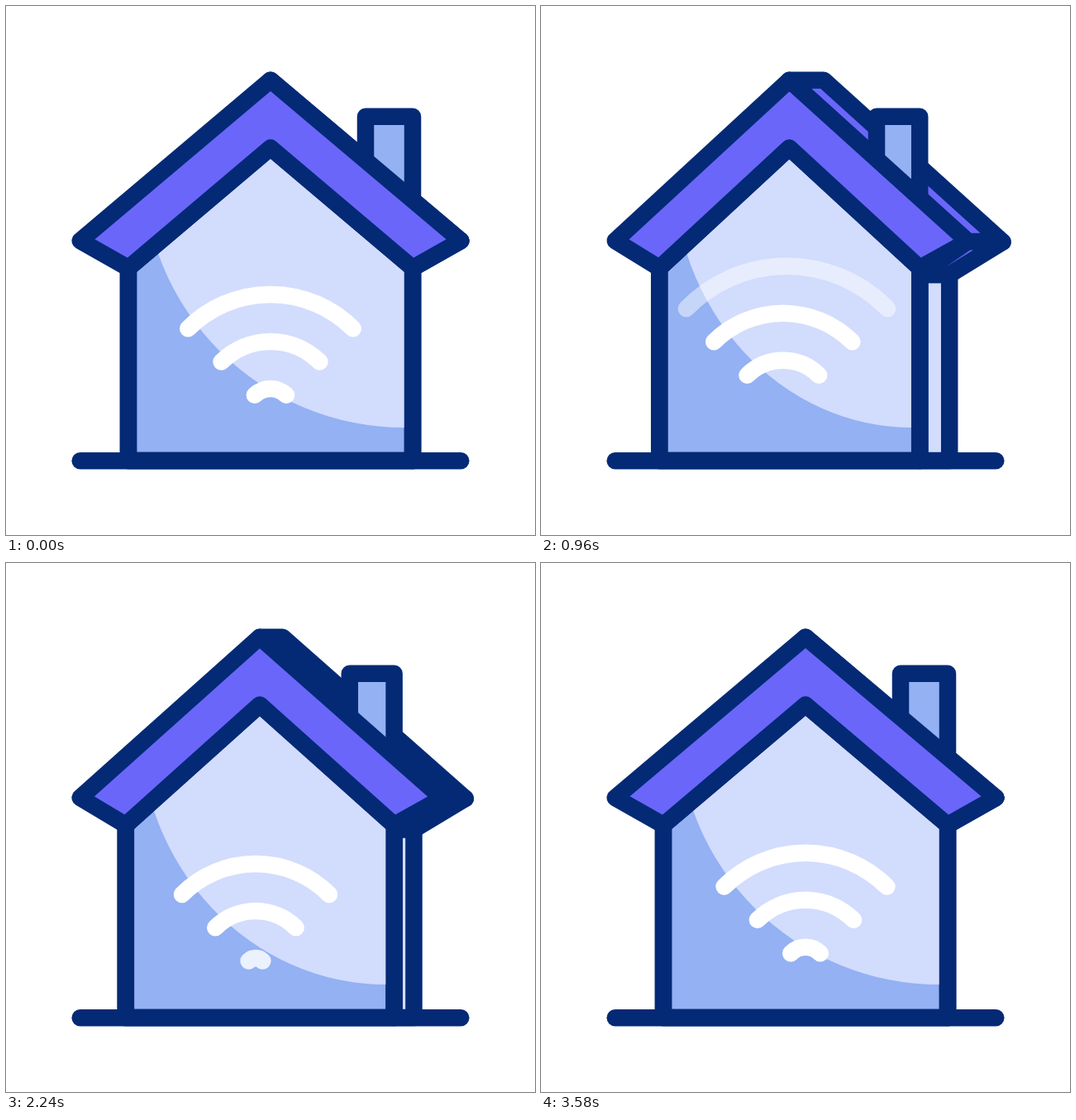
An HTML page with a canvas for the animation above (3600 ms loop, 640 by 640 pixels).

```html
<!DOCTYPE html>
<html lang="en">
<head>
<meta charset="utf-8">
<title>Smart home</title>
<style>
  html, body { margin: 0; width: 100%; height: 100%; overflow: hidden; background: #fff; }
  canvas { display: block; width: 640px; height: 640px; }
</style>
</head>
<body>
<canvas id="stage" width="640" height="640"></canvas>
<script>
const ctx = document.getElementById('stage').getContext('2d');
const NAVY = '#042a76', PURPLE = '#6a66fa', LIGHT = '#d2dcfd', BLUE = '#93b1f3';
const LOOP = 3600, PULSE = 600;
const GAP = 57, R_MIN = 9, R_MAX = R_MIN + 3 * GAP;

const clamp = v => Math.min(1, Math.max(0, v));
const ease = (t, start, end) => {
  const u = clamp((t - start) / (end - start));
  return u * u * (3 - 2 * u);
};

function shape(points, fill, closed = true) {
  ctx.beginPath();
  points.forEach(p => ctx.lineTo(...p));
  if (closed) ctx.closePath();
  if (fill) {
    ctx.fillStyle = fill;
    ctx.fill();
  }
  ctx.strokeStyle = NAVY;
  ctx.stroke();
}

function drawHouse(turn) {
  const mix = (a, b) => a + (b - a) * turn;
  const left = mix(148, 141.5), right = mix(492, 446), back = mix(492, 495);
  const ridge = mix(320, 293.3);
  const apex = [ridge, 89.7], eaveLeft = [89.7, 284], eaveRight = [mix(550.4, 504), mix(284, 285)];
  const backApex = [mix(320, 350), 89.7], backEave = [mix(550.4, 561.5), mix(284, 286)];
  const sill = mix(317, 328);

  // side of the house and the roof seen from the side
  shape([[right, sill], [back, sill], [back, 550], [right, 550]], LIGHT);
  shape([eaveRight, backEave, [back, sill], [right, sill]], PURPLE);
  shape([apex, backApex, backEave, eaveRight], PURPLE);

  // chimney, standing on the front roof edge
  const slope = (eaveRight[1] - apex[1]) / (eaveRight[0] - ridge);
  const roofY = x => apex[1] + (x - ridge) * slope;
  const chimney = mix(435, 395.5);
  shape([[chimney, roofY(chimney)], [chimney, 133.7], [right, 133.7], [right, roofY(right)]], BLUE, false);

  // front wall with its curved light
  const front = [[left, 550], [left, 317], [ridge, 171.5], [right, 317], [right, 550]];
  const squash = (right - left) / 344;
  shape(front, BLUE);
  ctx.save();
  ctx.clip();
  ctx.fillStyle = LIGHT;
  ctx.beginPath();
  ctx.ellipse(left + 334 * squash, 194, 316 * squash, 316, 0, 0, 2 * Math.PI);
  ctx.fill();
  ctx.restore();
  shape(front);

  shape([apex, eaveRight, [right, 317], [ridge, 171.5], [left, 317], eaveLeft], PURPLE);
  shape([[89.7, 550.2], [550.3, 550.2]], null, false);
}

function drawWave(x, r) {
  const drift = Math.max(0, r - 142) * 0.14;
  const half = r * Math.SQRT1_2 - drift / 2;
  const rise = r * (1 - Math.SQRT1_2);
  const radius = (half * half + rise * rise) / (2 * rise);
  const angle = Math.asin(Math.min(1, half / radius));
  ctx.globalAlpha = clamp((r - R_MIN + 2) / 6) * clamp((R_MAX - r) / 10);
  ctx.strokeStyle = '#fff';
  ctx.beginPath();
  ctx.arc(x + drift, 490 - r + radius, radius, -Math.PI / 2 - angle, -Math.PI / 2 + angle);
  ctx.stroke();
  ctx.globalAlpha = 1;
}

function draw(now) {
  const t = now % LOOP;
  const turn = ease(t, 140, 1380) - ease(t, 1610, 2850);
  ctx.clearRect(0, 0, 640, 640);
  ctx.lineWidth = 20.5;
  ctx.lineCap = ctx.lineJoin = 'round';
  drawHouse(turn);
  const phase = (t / PULSE + 0.316) % 1;
  for (let i = 0; i < 3; i++) drawWave(320 - 37 * turn, R_MIN + GAP * (phase + i));
}

const start = performance.now();
function tick() {
  draw(performance.now() - start);
  requestAnimationFrame(tick);
}
tick();
</script>
</body>
</html>
```
